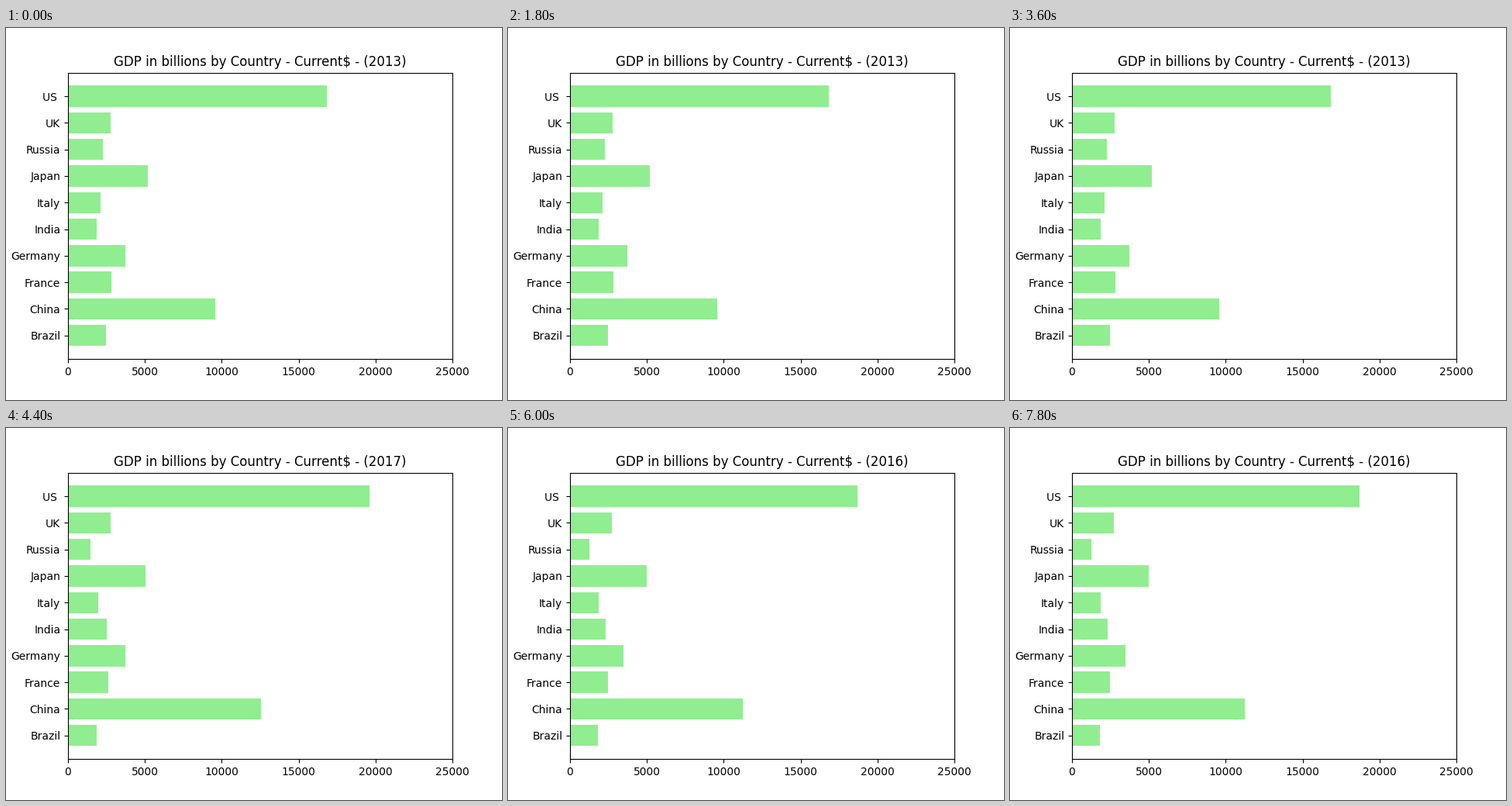
Animation of 640x480 px, one loop 8 s. Source, as a matplotlib script:

```python
import numpy as np
import matplotlib.pyplot as plt
from matplotlib.animation import FuncAnimation

FIRST_YEAR, LAST_YEAR = 2013, 2021
STEP_MS = 200
FRAMES = 40

# GDP in billions at the turning points; years between follow a straight line
TURNS = [2013, 2016, 2018, 2020, 2021]
GDP = {
    "Brazil": [2473, 1796, 1917, 1449, 1609],
    "China": [9570, 11233, 13895, 14688, 17734],
    "France": [2811, 2473, 2791, 2639, 2958],
    "Germany": [3733, 3470, 3974, 3890, 4260],
    "India": [1857, 2295, 2703, 2668, 3176],
    "Italy": [2141, 1877, 2092, 1897, 2108],
    "Japan": [5212, 5004, 5041, 5040, 4941],
    "Russia": [2292, 1277, 1657, 1489, 1779],
    "UK": [2786, 2700, 2878, 2705, 3131],
    "US ": [16843, 18695, 20533, 21060, 23315],
}

fig, ax = plt.subplots(figsize=(6.4, 4.8), dpi=100)
bars = ax.barh(list(GDP), [v[0] for v in GDP.values()], color="lightgreen")
ax.set_xlim(0, 25000)
title = ax.set_title("")


def update(frame):
    year = FIRST_YEAR + frame % (LAST_YEAR - FIRST_YEAR + 1)
    for bar, values in zip(bars, GDP.values()):
        bar.set_width(np.interp(year, TURNS, values))
    title.set_text(f"GDP in billions by Country - Current$ - ({year})")
    return [*bars, title]


anim = FuncAnimation(fig, update, frames=FRAMES, interval=STEP_MS,
                     init_func=lambda: update(0), repeat=True, repeat_delay=0)
plt.show()
```
